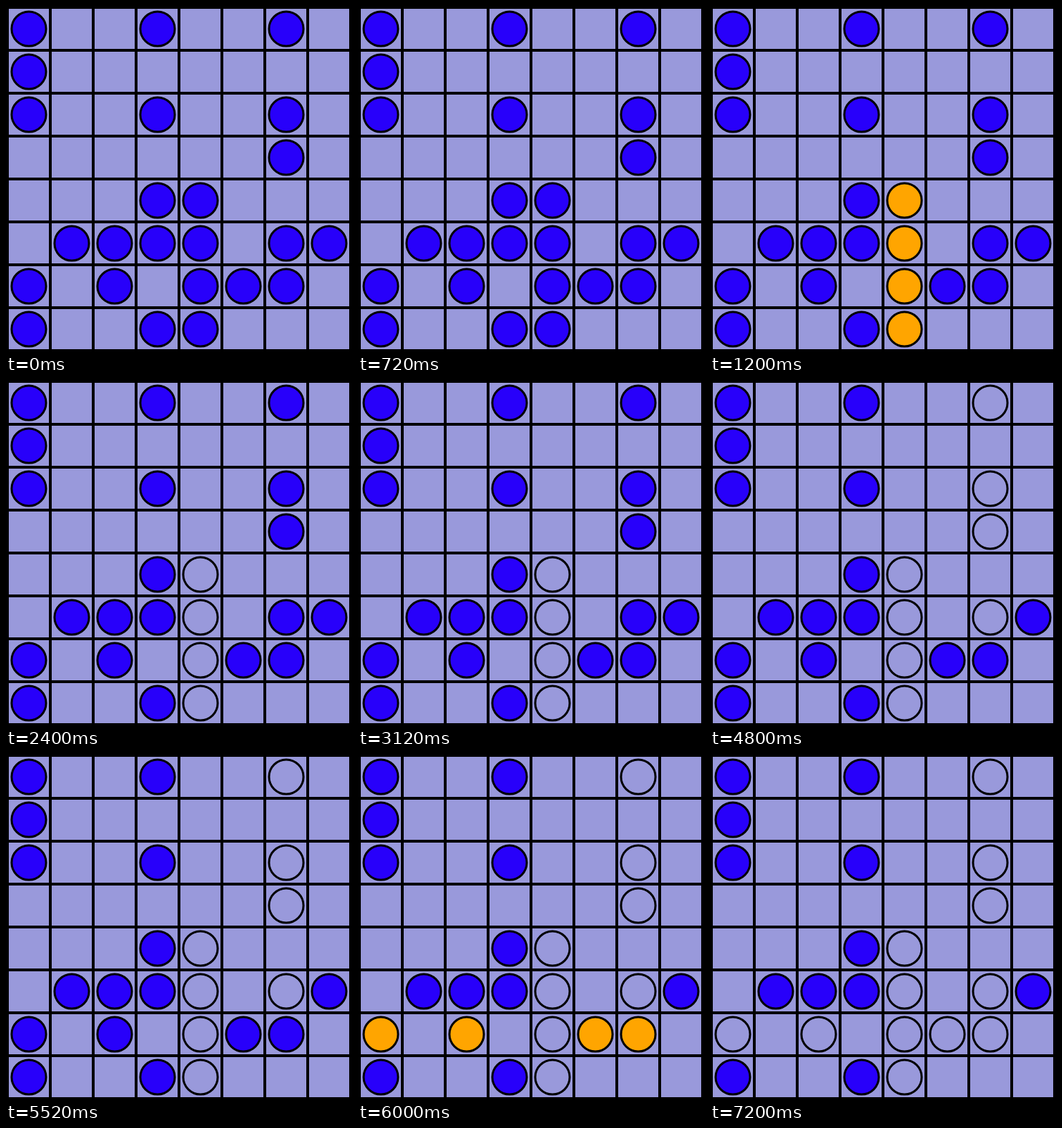
These frames come from a looping animation (492x492 px, 8000 ms). An HTML page:

```html
<!DOCTYPE html>
<html lang="en">
<head>
<meta charset="utf-8">
<title>Lines of four</title>
<style>
html, body { margin: 0; width: 100%; height: 100%; overflow: hidden; background: #9999db; }
svg { display: block; width: 100vw; height: 100vh; }
</style>
</head>
<body>
<svg id="board" viewBox="0 0 492 492"></svg>
<script>
const LOOP = 8000, STEP = 1200, PITCH = 61;
const BLUE = '#2800fa', ORANGE = '#ffa500';
const board = document.getElementById('board');

// Digits are the group that takes each disc away; o stays.
const rows = [
  'o..o..2.',
  'o.......',
  'o..o..2.',
  '......2.',
  '...o1...',
  '.ooo1.2o',
  '3.3.133.',
  'o..o1...'
];

function add(tag, attrs) {
  const el = document.createElementNS('http://www.w3.org/2000/svg', tag);
  for (const key in attrs) el.setAttribute(key, attrs[key]);
  board.append(el);
  return el;
}

let grid = '';
for (let i = 0; i <= 8; i++) {
  const p = 2 + i * PITCH;
  grid += `M${p} 0V492M0 ${p}H492`;
}
add('path', { d: grid, stroke: '#000', 'stroke-width': 4 });

const discs = [];
rows.forEach((row, y) => [...row].forEach((mark, x) => {
  if (mark === '.') return;
  const el = add('circle', {
    cx: 32.5 + x * PITCH, cy: 32.5 + y * PITCH, r: 24.5,
    fill: BLUE, stroke: '#000', 'stroke-width': 3
  });
  if (mark !== 'o') discs.push({ el, lit: 2 * mark - 1 });
}));

function draw(ms) {
  const step = Math.floor((ms % LOOP) / STEP);
  for (const { el, lit } of discs) {
    el.setAttribute('fill', step < lit ? BLUE : step === lit ? ORANGE : 'none');
  }
}

let start;
function tick(now) {
  start ??= now;
  draw(now - start);
  requestAnimationFrame(tick);
}
draw(0);
requestAnimationFrame(tick);
</script>
</body>
</html>
```
